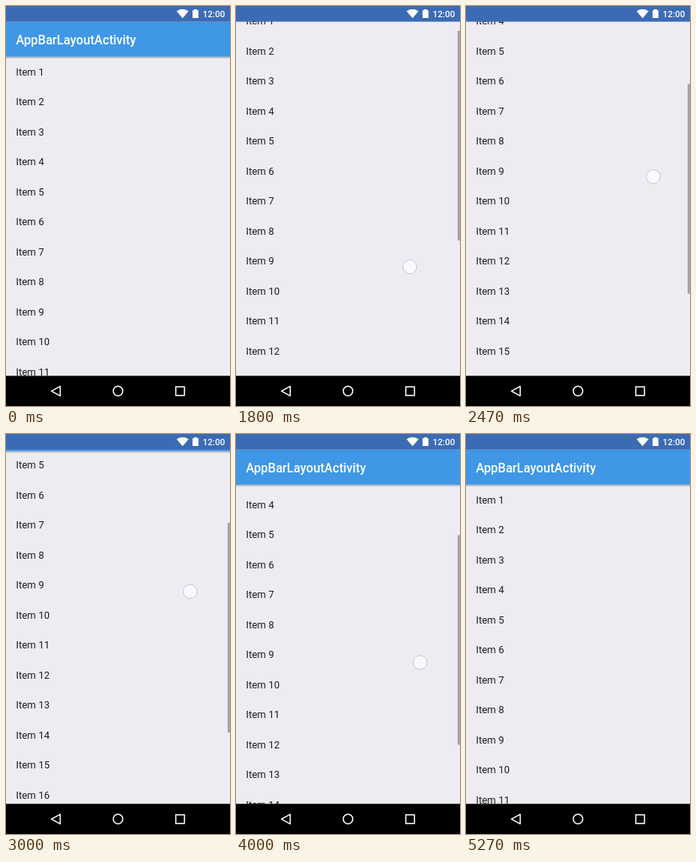
An HTML page that plays this animation: 281x500 px, repeating every 5.39 s.

```html
<!DOCTYPE html>
<html lang="en">
<head>
<meta charset="utf-8">
<title>Collapsing app bar</title>
<style>
  html, body { margin: 0; width: 100%; height: 100%; overflow: hidden; background: #eeecf0; }
  svg { display: block; width: 281px; height: 500px; font-family: Roboto, sans-serif; }
  #list { font-size: 12.5px; fill: #1c1c1e; }
  .medium { font-weight: 500; fill: #fff; }
  .nav { fill: none; stroke: #fff; stroke-width: 1.5; }
</style>
</head>
<body>
<svg viewBox="0 0 281 500">
  <defs>
    <linearGradient id="shade" x2="0" y2="1">
      <stop stop-color="#000" stop-opacity=".27"/>
      <stop offset="1" stop-color="#000" stop-opacity="0"/>
    </linearGradient>
  </defs>
  <rect width="281" height="500" fill="#eeecf0"/>
  <g id="list"></g>
  <rect id="thumb" x="278" width="3" height="262" fill="#a5a4a8"/>
  <g id="bar">
    <rect y="63.5" width="281" height="3" fill="url(#shade)"/>
    <rect y="19.5" width="281" height="44" fill="#3f97e5"/>
    <text class="medium" x="12.5" y="47.7" font-size="15.6">AppBarLayoutActivity</text>
  </g>
  <rect width="281" height="19.6" fill="#3b6bb5"/>
  <path d="M221.5 15.2 214 6.4Q221.5 1.6 229 6.4Z" fill="#fff"/>
  <path d="M234 5.2h2V4h3.400v1.200h2V15H234Z" fill="#fff"/>
  <text class="medium" x="246.800" y="14.200" font-size="11">12:00</text>
  <rect y="462.300" width="281" height="38" fill="#000"/>
  <g class="nav">
    <path d="M68 475.300V487.300L57 481.300Z" stroke-linejoin="round"/>
    <circle cx="140.500" cy="481.300" r="6"/>
    <rect x="213" y="476" width="10.800" height="10.800"/>
  </g>
  <circle id="touch" r="8.700" fill="#f8f8fd" stroke="#c6c5ea"/>
</svg>
<script>
const LOOP = 5390, STEP = 200 / 3;
const BAR = 44, ROW = 37.5, ROWS = 20;
const PEAK = 195.8, PEAK_TIME = 2870;
const THUMB_RATE = 443 / (ROW * ROWS);

// Finger path: time, x, y, vertical speed in px/ms
const path = [
  [1200, 203, 397, -.03],
  [1800, 218, 326, -.17],
  [2470, 235, 213, -.11],
  [PEAK_TIME, 233, 194.7, 0],
  [3000, 231, 197, .04],
  [3530, 231, 240, .1],
  [4000, 231, 285.5, .13],
  [4800, 230, 421, .05]
];

const el = id => document.getElementById(id);
const list = el('list'), thumb = el('thumb'), bar = el('bar'), touch = el('touch');
const clamp = (v, lo, hi) => Math.min(hi, Math.max(lo, v));
const shift = (node, x, y) => node.setAttribute('transform', `translate(${x} ${y})`);
const fade = (node, opacity) => node.setAttribute('opacity', opacity);

for (let i = 0; i < ROWS; i++) {
  const row = document.createElementNS('http://www.w3.org/2000/svg', 'text');
  row.setAttribute('x', 12.5);
  row.setAttribute('y', 86.9 + i * ROW);
  row.textContent = `Item ${i + 1}`;
  list.append(row);
}

function finger(time) {
  const t = clamp(time, path[0][0], path.at(-1)[0]);
  const i = Math.max(1, path.findIndex(p => p[0] >= t));
  const [t0, x0, y0, v0] = path[i - 1], [t1, x1, y1, v1] = path[i];
  const d = t1 - t0, u = (t - t0) / d, w = 1 - u;
  return {
    x: x0 + (x1 - x0) * u,
    y: w * w * (1 + 2 * u) * y0 + u * u * (3 - 2 * u) * y1 + d * u * w * (w * v0 - u * v1)
  };
}

function draw(t) {
  const { x, y } = finger(t);
  const drift = 2.5 * clamp((t - 2470) / 1000, 0, 1);
  const offset = clamp(389.5 - y + drift, 0, PEAK);
  // The bar leaves first on the way up and returns first on the way down
  const hidden = clamp(t < PEAK_TIME ? offset : BAR - (PEAK - offset), 0, BAR);
  const scroll = Math.max(0, offset - hidden);

  shift(list, 0, -offset);
  shift(bar, 0, -hidden);
  fade(bar, hidden < BAR ? 1 : 0);
  shift(thumb, 0, 63.5 - hidden + scroll * THUMB_RATE);
  fade(thumb, scroll > 0 || t > 2000 ? clamp((5000 + 4 * STEP - t) / (4 * STEP), 0, 1) : 0);
  shift(touch, x, y);
  fade(touch, t < 1199 ? 0 : Math.min(clamp(.5 + (t - 1200) / 150, 0, 1), clamp((4866 - t) / 130, 0, 1)));
}

function tick(now) {
  draw(Math.floor((now % LOOP + 5) / STEP) * STEP);
  requestAnimationFrame(tick);
}
draw(0);
requestAnimationFrame(tick);
</script>
</body>
</html>
```
